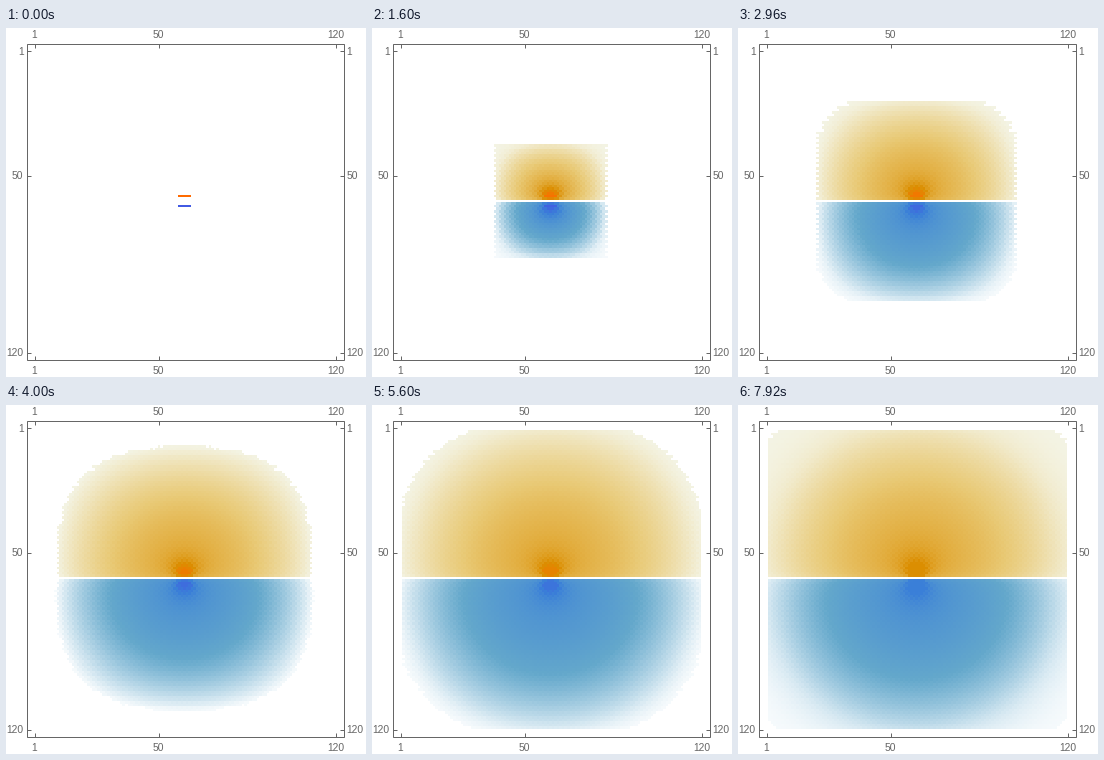
Recreate the animation shown at these times as a matplotlib script. Size 360x349 px, loop 8 s.

```python
import numpy as np
import matplotlib.pyplot as plt
from matplotlib.animation import FuncAnimation
from matplotlib.patches import Rectangle

W, H, DPI = 360, 349, 100
N, STEPS, INTERVAL = 120, 100, 80
CELL, LEFT, TOP = 2.533, 27.8, 22.45
GREY = "#666666"

# Colour stops for magnitudes 0, 1/3, 2/3 and 1
STOPS = np.linspace(0, 1, 4)
WARM = np.array([[.957, .957, .896], [.913, .791, .463],
                 [.860, .559, .007], [1, .42, 0]])
COOL = np.array([[.965, .982, .990], [.392, .659, .798],
                 [.230, .500, .848], [.260, .356, .892]])


def pixel_cells(size, start):
    """Grid cell under each pixel centre; the empty rim covers the rest."""
    cells = np.floor((np.arange(size) + 0.5 - start) / CELL)
    return np.clip(cells, 0, N - 1).astype(int)


ROWS = pixel_cells(H, TOP)
COLS = pixel_cells(W, LEFT)


def hold_plates(u):
    u[57, 57:62] = 1
    u[61, 57:62] = -1


def relax():
    """Potential between two plates, relaxed over diagonal neighbours."""
    u = np.zeros((N, N))
    hold_plates(u)
    states = []
    for _ in range(STEPS):
        states.append(u)
        pairs = u[:, :-2] + u[:, 2:]
        u = np.zeros((N, N))
        u[1:-1, 1:-1] = (pairs[:-2] + pairs[2:]) / 4
        hold_plates(u)
    return states


def magnitude(a, step):
    """Mean of value and rank, with the peak softening over time."""
    rank = np.searchsorted(np.sort(a), a, side="right") / a.size
    return np.minimum((a + rank) / 2, 1 - step / 300)


def blend(s, colours):
    return np.stack([np.interp(s, STOPS, c) for c in colours.T], axis=-1)


def paint(u, step):
    rgb = np.ones((N, N, 3))
    warm, cool = u > 1e-16, u < -5.5e-17
    live = warm | cool
    s = np.zeros((N, N))
    s[live] = magnitude(np.abs(u[live]), step)
    rgb[warm] = blend(s[warm], WARM)
    rgb[cool] = blend(s[cool], COOL)
    return rgb[np.ix_(ROWS, COLS)]


def draw_frame(ax):
    # Whole coordinates snap to the pixel that starts there
    x0, x1, y0, y1 = 21, 338, 16, 332
    px = 72 / DPI
    ax.add_patch(Rectangle((x0, y0), x1 - x0, y1 - y0, fill=False,
                           ec=GREY, lw=px, zorder=3))
    line = dict(color=GREY, lw=px, solid_capstyle="butt", zorder=3)
    font = dict(color=GREY, family="Liberation Sans", size=10.3 * px,
                va="baseline")
    for n in (1, 50, 120):
        x = LEFT + (n - 0.5) * CELL
        y = TOP + (n - 0.5) * CELL - 0.3
        for edge, d in ((y0, 4), (y1, -4)):
            ax.plot([x, x], [edge, edge + d], **line)
        for edge, d in ((x0, 4), (x1, -4)):
            ax.plot([edge, edge + d], [y, y], **line)
        ax.text(x - 1, 10.5, str(n), ha="center", **font)
        ax.text(x - 1, 345.5, str(n), ha="center", **font)
        ax.text(17.5, y + 3.6, str(n), ha="right", **font)
        ax.text(340.5, y + 3.6, str(n), ha="left", **font)


states = relax()
fig = plt.figure(figsize=(W / DPI, H / DPI), dpi=DPI, facecolor="white")
ax = fig.add_axes([0, 0, 1, 1])
ax.axis("off")
image = ax.imshow(paint(states[0], 0), extent=(0, W, H, 0), aspect="auto",
                  interpolation="nearest")
draw_frame(ax)
ax.set_xlim(0, W)
ax.set_ylim(H, 0)


def update(step):
    image.set_data(paint(states[step], step))
    return image,


anim = FuncAnimation(fig, update, frames=STEPS, interval=INTERVAL,
                     repeat=True, repeat_delay=0)
plt.show()
```
